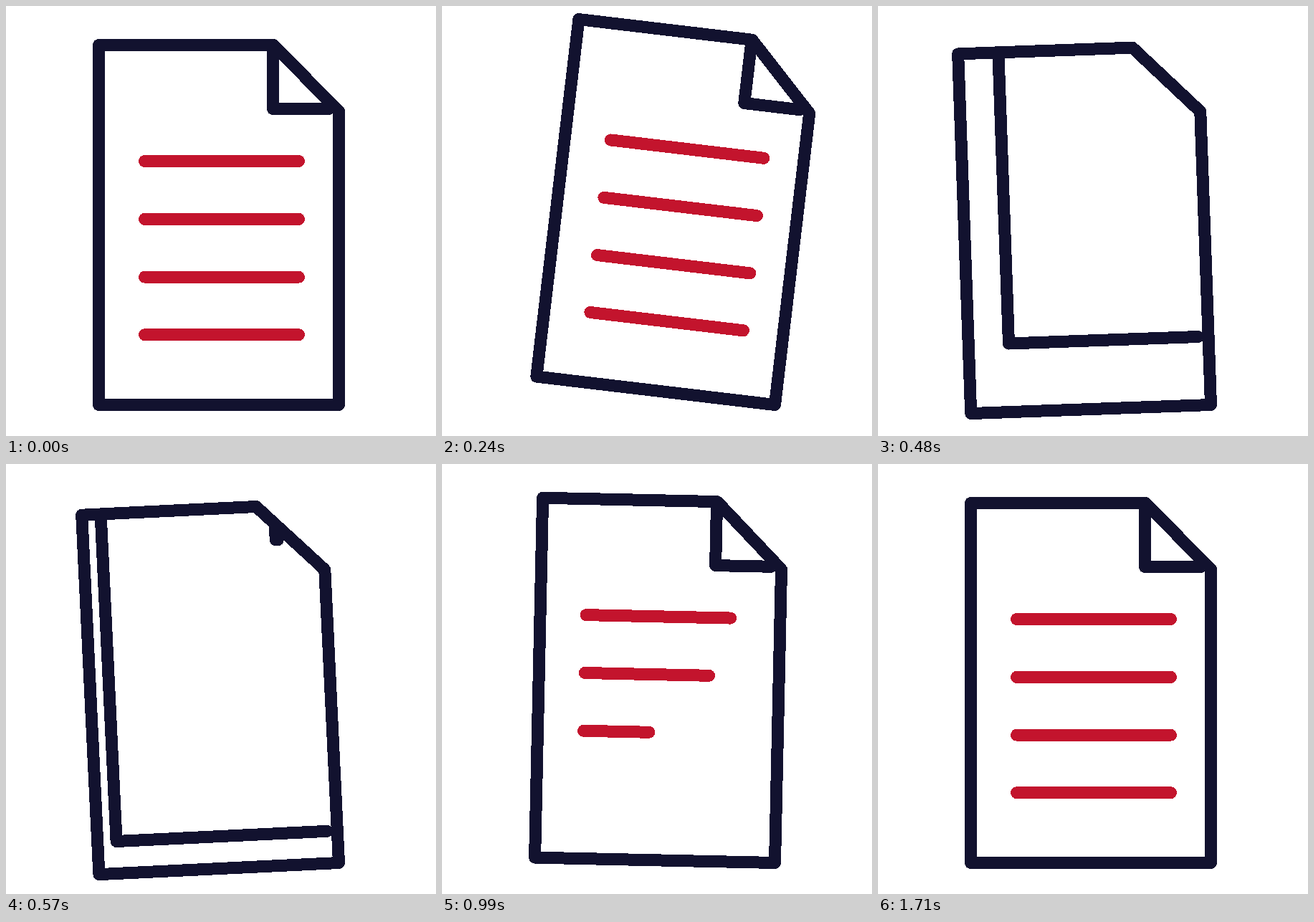
These frames come from a looping animation (600x600 px, 3400 ms). An HTML page:

```html
<!DOCTYPE html>
<html lang="en">
<head>
<meta charset="utf-8">
<title>Turning page</title>
<style>
  html, body { margin: 0; height: 100%; overflow: hidden; background: #fff; }
  svg { display: block; width: 100vw; height: 100vh; shape-rendering: crispEdges; }
  path { fill: none; stroke: #12122f; stroke-width: 17; stroke-linecap: round; stroke-linejoin: round; }
  .text path { stroke: #c3142d; }
  #sheet { fill: #fff; stroke: none; }
</style>
</head>
<body>
<svg viewBox="0 0 600 600">
  <g id="page">
    <g id="oldText" class="text"></g>
    <path id="sheet"/>
    <path id="sheetEdge"/>
    <path id="fold"/>
    <path d="M129.5 54.5H373L464.5 147V556.5H129.5Z"/>
    <g id="newText" class="text"></g>
  </g>
</svg>
<script>
const LOOP = 3400, STEP = 30, LAST_STEP = 57;
const LEFT = 193.5, LENGTH = 215;
const lineY = [216.5, 297.4, 378.2, 458.7];
// [step, degrees] of the page's swing around its lower right corner
const swing = [[0, 0], [9, 7], [10, 7], [17.4, -3], [29.5, 2], [38, 0]];

const el = id => document.getElementById(id);
const mix = (a, b, p) => a + (b - a) * p;
const progress = (t, start, end) => Math.min(1, Math.max(0, (t - start) / (end - start)));
const smooth = p => p * p * (3 - 2 * p);

function bezier(x1, y1, x2, y2) {
  const at = (a, b, s) => 3 * (1 - s) ** 2 * s * a + 3 * (1 - s) * s * s * b + s ** 3;
  return p => {
    if (p <= 0 || p >= 1) return p;
    let low = 0, high = 1;
    for (let i = 0; i < 30; i++) {
      const mid = (low + high) / 2;
      if (at(x1, x2, mid) < p) low = mid; else high = mid;
    }
    return at(y1, y2, low);
  };
}
const settle = bezier(1 / 6, 1 / 6, 0, 1);

function addLines(group) {
  return lineY.map(() => group.appendChild(
    document.createElementNS("http://www.w3.org/2000/svg", "path")));
}
const oldLines = addLines(el("oldText")), newLines = addLines(el("newText"));

function drawLine(path, y, amount) {
  path.setAttribute("d", amount > 0 ? `M${LEFT} ${y}h${LENGTH * amount}` : "");
}

function angleAt(t) {
  const i = swing.findIndex(([end]) => t < end);
  if (i < 0) return 0;
  const [start, from] = swing[i - 1], [end, to] = swing[i];
  return mix(from, to, smooth(progress(t, start, end)));
}

function draw(t) {
  el("page").setAttribute("transform", `rotate(${angleAt(t)} 464.5 556.5)`);

  // The folded corner spreads over the whole page
  const spread = settle(progress(t, 10, 28.5));
  const x = mix(372.5, 129.5, spread), y = mix(143.5, 556.5, spread);
  el("sheet").setAttribute("d", `M${x} 54.5H373L464.5 147V${y}H${x}Z`);
  el("sheetEdge").setAttribute("d", `M${x} 54.5V${y}H450`);

  // A new corner grows out of the cut edge
  const grow = settle(progress(t, 18, 29));
  const foldX = mix(406.5, 372.5, grow);
  el("fold").setAttribute("d", grow > 0
    ? `M${foldX} ${mix(88.5, 54.5, grow)}V${mix(88.5, 143.5, grow)}H${mix(385, 450, grow)}` : "");

  lineY.forEach((y, i) => {
    drawLine(oldLines[i], y, t < 20 ? 1 : 0);
    drawLine(newLines[i], y, settle(progress(t, 20 + 5 * i, 42 + 5 * i)));
  });
}

const begin = performance.now();
function tick() {
  const ms = (performance.now() - begin) % LOOP;
  draw(Math.min(LAST_STEP, Math.floor(ms / STEP)));
  requestAnimationFrame(tick);
}
tick();
</script>
</body>
</html>
```
